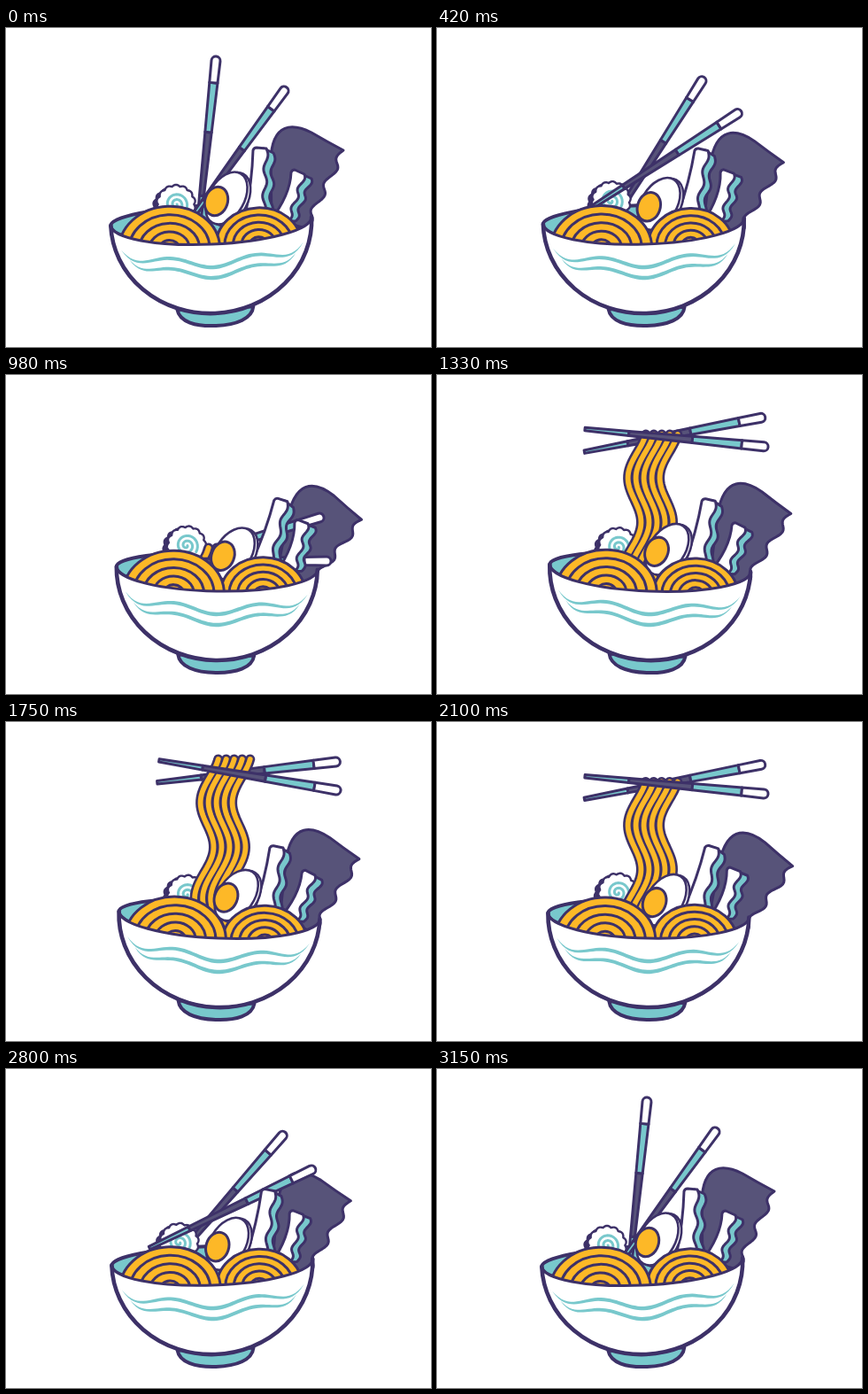
These frames come from a looping animation (480 px wide and 360 px high, 3.22 s). An HTML page:

```html
<!DOCTYPE html>
<html>
<head>
<meta charset="utf-8">
<style>
html, body { margin: 0; width: 100%; height: 100%; overflow: hidden; background: #fff; }
svg { display: block; width: 480px; height: 360px; }
path, ellipse { stroke-linejoin: round; stroke-linecap: round; }
</style>
</head>
<body>
<svg id="stage" viewBox="0 0 480 360"></svg>
<script>
const NAVY = '#3d3168', TEAL = '#78c8cc', GOLD = '#fdb827', SLATE = '#575379';
const LOOP = 3220, CYCLE = 3150, STEP = 70;
const DIPPED = 980, TOP = 1575, SUNK = 2520;
const stage = document.getElementById('stage');
const { PI, sin, cos, abs, sqrt } = Math;

const mix = (a, b, u) => a + (b - a) * u;
const path = (d, fill, stroke = NAVY, width = 3) =>
  `<path d="${d}" fill="${fill}" stroke="${stroke}" stroke-width="${width}"/>`;
const ellipse = (x, y, rx, ry, fill, tilt = 0, width = 3) =>
  `<ellipse cx="${x}" cy="${y}" rx="${rx}" ry="${ry}" transform="rotate(${tilt} ${x} ${y})" ` +
  `fill="${fill}" stroke="${NAVY}" stroke-width="${width}"/>`;
const group = (name, body) => `<g class="${name}">${body}</g>`;

// Points of f(u) for u from 0 to 1, joined for use inside a path
const plot = (n, f) => Array.from({ length: n + 1 }, (_, i) => f(i / n)).join('L');

// Line from one point to another with a sideways ripple
const ripple = (x0, y0, x1, y1, waves, size) =>
  plot(40, u => [mix(x0, x1, u) - size * sin(u * waves * 2 * PI), mix(y0, y1, u)]);

function mound(x, y, rx, ry) {
  return [1, 0.8, 0.6, 0.4, 0.2].map(f => ellipse(x, y, rx * f, ry * f, GOLD)).join('');
}

// Tapered band on the bowl: a ripple that climbs towards both ends
function wave(y, span) {
  const edge = (u, side) => {
    const v = 2 * u - 1;
    return [236.5 + span * v, y + 6 * cos(2 * PI * span * v / 100) - 24 * v ** 6 + side * 2.2 * sqrt(1 - v * v)];
  };
  return path('M' + plot(60, u => edge(u, -1)) + 'L' + plot(60, u => edge(1 - u, 1)) + 'Z', TEAL, 'none');
}

function stick(name) {
  const half = y => 5 - 3.3 * y / 203;
  const band = (a, b, fill) => path(`M${-half(a)} ${a}H${half(a)}L${half(b)} ${b}H${-half(b)}Z`, fill);
  return group(name, band(153, 203, TEAL) + band(81, 153, SLATE) + band(25, 81, TEAL) +
    path('M-4.6 25L-5 0A5 5 0 0 1 5 0L4.6 25Z', '#fff'));
}

function fishcake() {
  const polar = (a, r) => [192 + r * cos(a), 199 + r * sin(a)];
  const rim = 'M' + plot(168, u => polar(u * 2 * PI, 20.3 + 1.8 * abs(sin(u * 14 * PI)))) + 'Z';
  const spiral = 'M' + plot(60, u => polar(u * 13, 1 + 12 * u));
  return group('cake', `<g transform="translate(-4 3)">${path(rim, NAVY, NAVY, 2)}</g>` +
    path(rim, '#fff', NAVY, 2.4) + path(spiral, 'none', TEAL, 3));
}

function strands() {
  const lines = [-2, -1, 0, 1, 2].map(k => 'M' + plot(60, u => {
    const y = mix(41, 240, u);
    return [246 + 9 * k - 9 * cos(2 * PI * (y - 88) / 108) - (y - 115) * 0.06, y];
  }));
  return '<g clip-path="url(#above)">' + group('lift',
    lines.map(d => path(d, 'none', NAVY, 11)).join('') +
    lines.map(d => path(d, 'none', GOLD, 5.8)).join('')) + '</g>';
}

// Slice with a white face and a teal edge; x, y is the top left corner
function slice(name, x, y, foot, low, drop) {
  const face = ripple(x + 15, y + drop, foot + 21, low, 2.5, -2.2);
  const side = ripple(x + 23, y + drop + 5, foot + 29, low, 2.5, -2.2);
  return group(name, path(`M${x + 12} ${y + drop}L${side}H${foot + 6}Z`, TEAL) +
    path(`M${x + 4} ${y}L${face}H${foot}Q${x - 1} ${mix(y, low, 0.5)} ${x} ${y + 3}Q${x + 1} ${y} ${x + 4} ${y}Z`, '#fff'));
}

const nori = group('nori',
  path('M300 215L299 150C300 105 325 108 345 118Q362 128 381 138L' +
    ripple(381, 138, 338, 226, 3, 4) + 'Z', SLATE));

const egg = group('egg', ellipse(253, 193, 20, 32, '#fff', 28, 2.6) +
  ellipse(249, 192, 20, 32, '#fff', 30, 2.6) + ellipse(237.5, 195.5, 12.8, 16.6, GOLD, 18));

const level = body => `<g transform="rotate(-2.45 237 330)">${body}</g>`;

const inside = level(path('M123 218A113.5 18 0 0 1 350 218A113.5 26 0 0 1 123 218Z', TEAL, NAVY, 4));

const bowl = level(
  path('M194 316C196 330 214 336 237 336S278 330 280 316Z', TEAL, NAVY, 4) +
  mound(289, 246, 48, 41) + mound(188, 247, 57, 48) +
  path('M123 218A113.5 26 0 0 0 350 218A113.5 104 0 0 1 123 218Z', '#fff') +
  path('M123 218A113.5 104 0 0 0 350 218', 'none', NAVY, 4.6) +
  wave(264, 103) + wave(276, 94));

stage.innerHTML = '<clipPath id="above"><path d="M0 0H480V260H0Z"/></clipPath>' +
  group('sway', inside + nori) + stick('back') + group('sway', fishcake()) + strands() + stick('front') +
  group('sway', slice('pork', 279, 135, 270, 212, 1) + slice('bamboo', 322, 160, 298, 218, 5) + egg + bowl);

// Poses of each stick: x, y and lean from vertical
const sticks = {
  back: { rest: [237, 37, 6], dip: [354, 161, 73], high: [374, 45, 85] },
  front: { rest: [314, 71, 36], dip: [362, 210, 90], high: [374, 77, 101] }
};

const blend = (a, b, u, powers) => a.map((v, i) => mix(v, b[i], u ** powers[i]));

function place(name, transform) {
  for (const el of stage.getElementsByClassName(name)) el.setAttribute('transform', transform);
}

function draw(t) {
  const phase = 2 * PI * t / CYCLE;
  const wag = abs(sin(phase)) ** 1.4;
  place('sway', `rotate(${2.45 * (1 - cos(phase))} 237 330)`);
  place('nori', `rotate(${9.5 * wag} 280 216)`);
  place('pork', `rotate(${10.5 * wag} 286 214)`);
  place('bamboo', `rotate(${-7.5 * wag} 308 212)`);
  place('egg', `translate(0 ${9.5 * wag})`);
  place('cake', `translate(0 ${-5 * wag}) rotate(${6 * wag} 193 240)`);

  const lifting = t >= DIPPED && t < SUNK;
  const depth = t < TOP ? ((TOP - t) / (TOP - DIPPED)) ** 2 : ((t - TOP) / (SUNK - TOP)) ** 3;
  const fall = t < DIPPED ? t / DIPPED : (CYCLE - t) / (CYCLE - SUNK);
  for (const name in sticks) {
    const { rest, dip, high } = sticks[name];
    const [x, y, lean] = lifting ? blend(high, dip, depth, [0.5, 2, 0.4])
      : blend(rest, dip, Math.max(fall, 0), [0.75, 2, 1.1]);
    place(name, `translate(${x} ${y}) rotate(${lean})`);
  }
  // Out of sight below the rim unless the sticks hold the noodles
  place('lift', lifting ? `translate(${-12 * sqrt(depth)} ${154 * depth})` : 'translate(0 300)');
}

const start = performance.now();
function loop() {
  draw(Math.floor((performance.now() - start) % LOOP / STEP) * STEP);
  requestAnimationFrame(loop);
}
loop();
</script>
</body>
</html>
```
